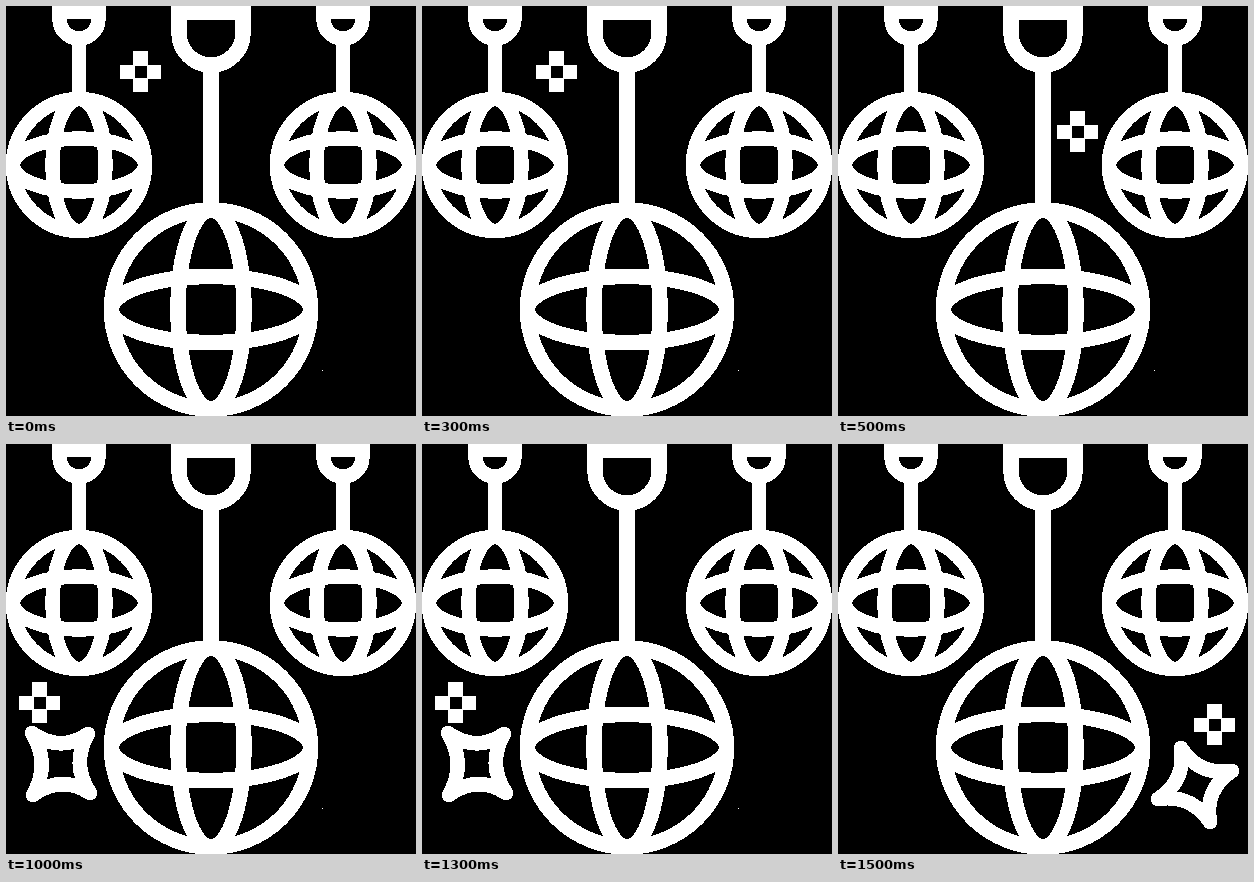
An HTML page for the animation above (2000 ms loop, 410 by 410 pixels).

```html
<!DOCTYPE html>
<html lang="en">
<head>
<meta charset="utf-8">
<title>Disco balls</title>
<style>
  html, body { margin: 0; width: 100%; height: 100%; overflow: hidden; background: #000; }
  svg { display: block; width: 100vw; height: 100vh; }
</style>
</head>
<body>
<svg viewBox="0 0 410 410" shape-rendering="crispEdges">
  <g id="balls" fill="none" stroke="#fff"></g>
  <path id="spark" fill="#fff" fill-rule="evenodd" d="M-7.5-20.5H7.5V-7H20.5V7H7.5V20.5H-7.5V7H-20.5V-7H-7.5Z M-6-6V6H6V-6Z"/>
  <path id="star" fill="none" stroke="#fff" stroke-width="14.5" stroke-linejoin="round"/>
  <rect id="dot" x="316" y="364" width="1" height="1" fill="#fff"/>
</svg>
<script>
  const el = id => document.getElementById(id);
  const LOOP = 2000;

  // A ball hanging from a D-shaped mount: ring radius r, inner ellipse radius e, line width w.
  function ball(x, y, r, e, mount, wall, w) {
    const low = wall + mount;
    return `<g stroke-width="${w}">
      <circle cx="${x}" cy="${y}" r="${r}"/>
      <ellipse cx="${x}" cy="${y}" rx="${e}" ry="${r}"/>
      <ellipse cx="${x}" cy="${y}" rx="${r}" ry="${e}"/>
      <path d="M${x} ${low}V${y - r}M${x - mount} 6H${x + mount}V${wall}A${mount} ${mount} 0 0 1 ${x - mount} ${wall}Z"/>
    </g>`;
  }

  // Four tips joined by curves that bend toward the middle.
  function starPath(tips) {
    const mid = k => tips.reduce((sum, p) => sum + p[k], 0) / 4;
    const bend = (a, b) => [0, 1].map(k => (a[k] + b[k]) * 0.175 + mid(k) * 0.65);
    return "M" + tips[0] + tips.map((p, i) => {
      const next = tips[(i + 1) % 4];
      return "Q" + bend(p, next) + " " + next;
    }).join("") + "Z";
  }

  el("balls").innerHTML =
    ball(73, 159, 66, 26.5, 19.5, 13, 14.5) +
    ball(337, 159, 66, 26.5, 19.5, 13, 14.5) +
    ball(205, 303.5, 99.5, 33, 32, 27, 15.5);

  const steps = [
    { spark: [134.5, 65.5] },
    { spark: [239.5, 125.5] },
    { spark: [33.5, 258.5], star: [[26, 289], [82, 290], [84, 349], [27, 351]] },
    { spark: [376.5, 280.5], star: [[343, 304], [394, 327], [372, 378], [320, 355]] }
  ];

  function draw(ms) {
    const i = Math.floor((ms % LOOP) / LOOP * steps.length);
    const { spark, star } = steps[i];
    el("spark").setAttribute("transform", `translate(${spark})`);
    el("star").setAttribute("d", star ? starPath(star) : "");
    el("dot").style.display = i < 3 ? "" : "none";
  }

  const start = performance.now();
  function tick() {
    draw(performance.now() - start);
    requestAnimationFrame(tick);
  }
  draw(0);
  requestAnimationFrame(tick);
</script>
</body>
</html>
```
